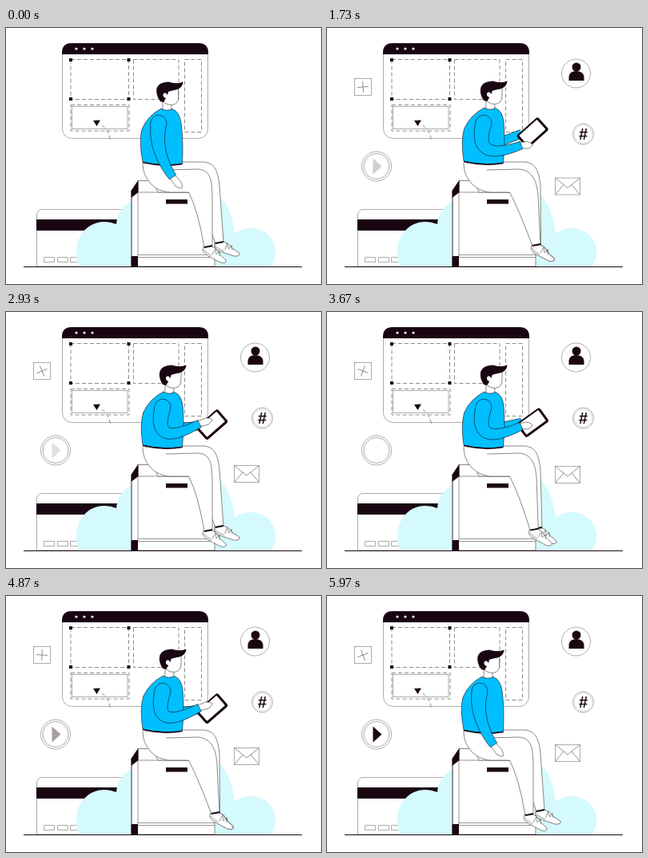
These frames come from a looping animation (394x321 px, 6010 ms). An HTML page:

```html
<!DOCTYPE html>
<html lang="en">
<head>
<meta charset="utf-8">
<title>Browsing on a tablet</title>
<style>
  html, body { margin: 0; width: 100%; height: 100%; overflow: hidden; background: #fff; }
  svg { display: block; }
  .ink { fill: #1a0612; }
  .line { fill: none; stroke: #666; stroke-width: .7; }
  .paper { fill: #fff; stroke: #555; stroke-width: .7; stroke-linejoin: round; }
  .faint { fill: #fff; stroke: #888; stroke-width: .7; }
  .dash { fill: none; stroke: #8c8c8c; stroke-width: 1; stroke-dasharray: 5 3; }
  .blue { fill: #00bfff; stroke: #1a0612; stroke-width: .6; stroke-linejoin: round; }
  .cuff { stroke: #1a0612; stroke-width: 2; }
  .hash { font: bold 20px "Liberation Sans", Arial, sans-serif; text-anchor: middle; }
</style>
</head>
<body>
<svg width="394" height="321" viewBox="0 0 394 321">
  <defs>
    <path id="shoe" d="M-6 1L-7 6Q-5 10 0 13L15 21Q23 23 22 18Q14 12 10 4L5 1Z"/>
    <path id="laces" d="M5 11L9 4L10 11L14 7L14 13M-6 5Q-1 10 4 13"/>
  </defs>

  <!-- window -->
  <rect class="faint" x="70.5" y="19.5" width="182" height="119" rx="12"/>
  <path class="ink" d="M70 33V31Q70 19 82 19H241Q253 19 253 31V33Z"/>
  <g fill="#fff"><circle cx="88" cy="26" r="1.6"/><circle cx="98" cy="26" r="1.6"/><circle cx="108" cy="26" r="1.6"/></g>
  <rect class="dash" x="81" y="39.5" width="72.5" height="50"/>
  <rect class="dash" x="159.5" y="39.5" width="56.5" height="50"/>
  <rect class="dash" x="223.5" y="39.5" width="21" height="91"/>
  <rect class="dash" x="81" y="96.5" width="73" height="32.5"/>
  <rect class="faint" x="82.5" y="98.5" width="69.5" height="28"/>
  <path class="ink" d="M79 38h4v4h-4zM151.500 38h4v4h-4zM79 87h4v4h-4zM151.500 87h4v4h-4zM109 116L118 115.500L113.500 123Z"/>
  <path class="dash" d="M120 122Q128 128 130.500 140"/>

  <!-- card, cloud, ground -->
  <path class="faint" d="M38.500 299V235Q38.500 227.500 46 227.500H150V299Z"/>
  <rect class="ink" x="38" y="240" width="112" height="14"/>
  <path class="faint" d="M47.500 287.500h13v6h-13zM64.500 287.500h13v6h-13zM80.500 287.500h13v6h-13z"/>
  <path fill="#d5fafe" d="M91 299C81 270 97 243 123 243Q131 243 138 246C139 232 148 220 160 216L262 206C275 215 283 232 286 258C300 246 325 250 333 266C340 278 338 290 331 299Z"/>

  <!-- cabinet -->
  <path class="paper" d="M157 299V204L165 191.500H261V299Z"/>
  <path class="line" d="M165 191V286M165 206H261M165 284.500H261M165 287.500H261"/>
  <path class="ink" d="M156.500 213V204L165.500 191V206ZM200 215h27v5.500h-27zM156.500 286h8.500v13h-8.500z"/>
  <path class="line" style="stroke-width:1" d="M157 212V287"/>
  <path class="line" style="stroke:#1a0612;stroke-width:1" d="M22 299.500H370"/>

  <!-- person -->
  <g id="farLeg"></g>
  <g id="nearLeg"></g>
  <g id="farArm">
    <path id="sleeveEdge" fill="none" stroke="#1a0612" stroke-width="11.200"/>
    <path id="sleeve" fill="none" stroke="#00bfff" stroke-width="10"/>
  </g>
  <g id="tablet">
    <rect class="ink" x="-10.500" y="-18" width="21.500" height="36" rx="3"/>
    <rect fill="#fff" x="-8.500" y="-15" width="16.500" height="30" rx="1"/>
  </g>
  <g id="body">
    <path class="paper" d="M196 88V105H207V94Z"/>
    <path class="paper" d="M193 80Q194 94 203 96Q213 98 215.500 90V74L200 71Z"/>
    <path class="ink" d="M193 92Q187 84 188.500 75.500Q191 68 203 67.500Q214 71 221.500 67.500Q221 75 213 77.500Q206 78.500 203 80L202 84Q199 79 196.500 83Q196 87 200 88L197 93Z"/>
    <path class="blue" d="M194 101Q200 105 208 101.500Q217 105 219 119Q222 142 220.500 170Q196 174 171 168Q166 142 170 127Q177 110 194 101Z"/>
    <path class="line" style="stroke:#1a0612;stroke-width:1.600" d="M171 168.500Q196 174.500 220.500 170.500"/>
  </g>
  <path id="hand" class="paper"/>
  <path id="arm" class="blue"/>

  <!-- floating icons -->
  <g id="user">
    <circle class="faint" r="18"/>
    <circle class="ink" cx=".5" cy="-8" r="5.500"/>
    <path class="ink" d="M-9 9V4Q-8-3 0-3Q9-3 10 4V9Z"/>
  </g>
  <g id="tag">
    <circle class="faint" r="13"/><circle class="faint" r="11.200" style="stroke:#ccc"/>
    <text class="hash ink" y="7">#</text>
  </g>
  <g id="add">
    <rect class="faint" x="-10.500" y="-10.500" width="21" height="21"/>
    <path id="plus" class="line" d="M-7 0H7M0-7V7"/>
  </g>
  <g id="play">
    <circle class="faint" r="18.500"/><circle class="faint" r="16"/>
    <path id="triangle" class="ink" d="M-4.500-10V10L6.500 0Z"/>
  </g>
  <g id="mail">
    <rect class="faint" x="-15.500" y="-10.500" width="31" height="21"/>
    <path class="line" d="M-15.500-10.500L0 2L15.500-10.500M-15.500 10.500L-5-2M15.500 10.500L5-2"/>
  </g>
</svg>

<script>
const LOOP = 6010, STEP = 100 / 3;
const $ = id => document.getElementById(id);
const set = (id, name, value) => $(id).setAttribute(name, value);
const clamp = v => Math.min(1, Math.max(0, v));
const mix = (a, b, u) => a + (b - a) * u;
const smooth = u => u * u * (3 - 2 * u);
const wave = (t, period, peak) => Math.cos(2 * Math.PI * (t - peak) / period);

// time, lean, elbow, wrist, fingertip, tablet centre, tablet angle
const rest = [0, 191, 153, 208.5, 187, 220, 201, 196, 143, 0];
const lift = [1, 193, 157, 200.5, 188, 205, 206, 254.5, 119.5, 22];
const tap = [1, 197, 155, 242, 140, 258, 135, 257.5, 141, 49];
const poses = [
  [0, ...rest],
  [200, ...rest],
  [950, ...lift],
  [1150, ...lift],
  [1700, 1, 197, 155, 243, 147, 257, 147, 257, 131, 48],
  [2300, ...tap],
  [2930, ...tap],
  [3670, 1, 197, 155, 243, 143, 257, 142, 257, 138.5, 54],
  [4300, ...tap],
  [4950, ...tap],
  [5800, ...rest],
  [LOOP, ...rest]
];
const glow = [[0, .3], [1070, .3], [1730, .2], [2930, .13], [3670, 0], [4870, .38], [5970, 1], [LOOP, 1]];

function sample(keys, t, ease = u => u) {
  const i = Math.max(1, keys.findIndex(k => k[0] >= t));
  const a = keys[i - 1], b = keys[i];
  const u = ease(clamp((t - a[0]) / (b[0] - a[0])));
  return a.slice(1).map((v, n) => mix(v, b[n + 1], u));
}

function pop(t, start) {
  const u = clamp((t - start) / 500) - 1;
  return t < start ? 0 : 1 + 2.7 * u ** 3 + 1.7 * u ** 2;
}

// A tapered limb along a curve that bends near the elbow.
function limb(s, e, w, from, to) {
  const c = [0, 1].map(n => 1.7 * e[n] - .35 * (s[n] + w[n]));
  const left = [], right = [];
  for (let i = 0; i <= 14; i++) {
    const u = i / 14, v = 1 - u;
    const p = [0, 1].map(n => v * v * s[n] + 2 * u * v * c[n] + u * u * w[n]);
    const d = [0, 1].map(n => v * (c[n] - s[n]) + u * (w[n] - c[n]));
    const k = mix(from, to, u) / Math.hypot(...d);
    left.push([p[0] + d[1] * k, p[1] - d[0] * k]);
    right.unshift([p[0] - d[1] * k, p[1] + d[0] * k]);
  }
  const text = pts => pts.map(p => p.map(v => v.toFixed(2)).join(" ")).join("L");
  return `M${text(left)}L${text(right)}A${from} ${from} 0 0 1 ${text([left[0]])}`;
}

function palm(w, h) {
  const dx = h[0] - w[0], dy = h[1] - w[1], k = 4 / Math.hypot(dx, dy);
  const nx = -dy * k, ny = dx * k;
  const at = (u, v) => `${w[0] + dx * u + nx * v} ${w[1] + dy * u + ny * v}`;
  return `M${at(-.1, -.9)}L${at(.55, -1.1)}Q${at(.95, -.7)} ${at(1, 0)}` +
    `Q${at(.9, .7)} ${at(.6, 1.1)}L${at(-.1, .9)}Z`;
}

function leg(id, x, y, tilt, outline) {
  $(id).innerHTML = `<g transform="translate(${x} ${y}) rotate(${tilt})">
    <use href="#shoe" class="paper"/><use href="#laces" class="line"/></g>
    <path class="paper" d="${outline}"/>
    <path class="cuff" d="M${x - 5} ${y + 2}L${x + 5} ${y}"/>`;
}

function drawLegs(t) {
  const s = ((1 + wave(t, 3000, 0)) / 2) ** 2.2;
  const nx = mix(262, 253, s), ny = mix(271, 273, s);
  const fx = mix(262.5, 267, s), fy = mix(271, 268, s);
  leg("farLeg", fx, fy, -10 * s,
    `M175 168H243C261 167 265 179 267 198L${fx + 5} ${fy}L${fx - 5} ${fy + 2}L238 206H190Z`);
  leg("nearLeg", nx, ny, 0,
    `M200 178L240 177C258 178 ${mix(263, 257, s)} 195 ${mix(264, 258, s)} 210L${nx + 5} ${ny}` +
    `L${nx - 5} ${ny + 2}Q240 228 228.500 206H205C186 205 171 190 171 169`);
}

function drawTop(t) {
  const [lean, ex, ey, wx, wy, hx, hy, tx, ty, angle] = sample(poses, t, smooth);
  const k = -.04 * lean;
  set("body", "transform", `matrix(1 0 ${k} 1 ${-k * 170} ${-lean})`);
  set("tablet", "transform", `translate(${tx} ${ty}) rotate(${angle})`);
  const r = angle * Math.PI / 180, cos = Math.cos(r), sin = Math.sin(r);
  const reach = `M208 146L${tx - 8 * cos - 11 * sin} ${ty - 8 * sin + 11 * cos}`;
  set("sleeveEdge", "d", reach);
  set("sleeve", "d", reach);
  set("arm", "d", limb([191 + 5 * lean, 119], [ex, ey], [wx, wy], 10, 5));
  set("hand", "d", palm([wx, wy], [hx, hy]));
}

function drawIcons(t) {
  const place = (id, x, y, start) => {
    const size = pop(t, start);
    set(id, "transform", `translate(${x} ${y}) scale(${size})`);
    set(id, "opacity", clamp(size));
  };
  place("user", 311.5, 57, 150);
  place("tag", 320.5, 133, 250);
  place("add", 45, 74, 540);
  place("play", 62, 173.5, 980);
  place("mail", 301, 200 + 4 * wave(t, 6000, 3600), 980);
  set("plus", "transform", `rotate(${t * .06 - 19})`);
  set("triangle", "opacity", sample(glow, t)[0]);
}

function draw() {
  const now = performance.now() % LOOP;
  const t = Math.min(179, Math.floor((now + 3.4) / STEP)) * STEP;
  drawLegs(t);
  drawTop(t);
  drawIcons(t);
  requestAnimationFrame(draw);
}
draw();
</script>
</body>
</html>
```
